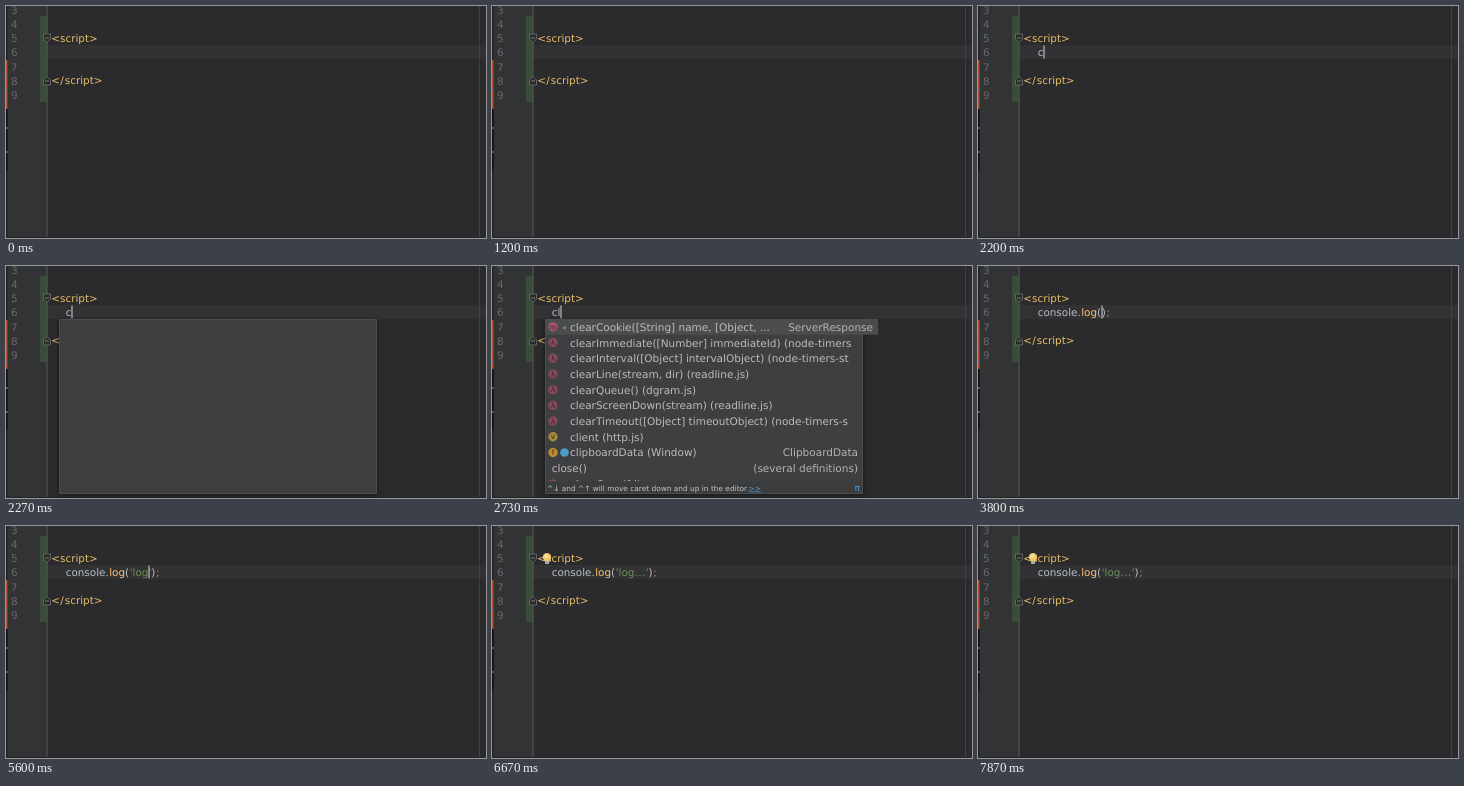
Animation, 480 px wide and 232 px high, one loop 7940 ms. Source, as an HTML page with a canvas:

```html
<!DOCTYPE html>
<html lang="en">
<head>
<meta charset="utf-8">
<style>
  html, body { margin: 0; width: 100%; height: 100%; overflow: hidden; background: #2b2a2c; }
  canvas { display: block; }
</style>
</head>
<body>
<canvas id="stage" width="480" height="232"></canvas>
<script>
const ctx = document.getElementById('stage').getContext('2d');
const LOOP = 7940;
const CODE = 10.4, LIST = 10.5, HINT = 7.4;
const ROW = 15.7;
const COLORS = { tag: '#e8bf6a', plain: '#b5bfcc', call: '#ffc66d', string: '#6a9159', end: '#cc7832' };

// Typed text on line 6: [time, before caret, after caret]
const EDITS = [
  [0, '', ''], [2200, 'c', ''], [2530, 'cl', ''], [2930, 'clo', ''], [3200, 'clog', ''],
  [3370, 'console.log(', ');'], [4870, "console.log('", "');"],
  [5130, "console.log('l", "');"], [5330, "console.log('lo", "');"],
  [5530, "console.log('log", "');"], [5730, "console.log('log.", "');"],
  [5900, "console.log('log..", "');"], [6070, "console.log('log...", "');"]
];

// [icon, label, right-hand note]
const ITEMS = [
  ['method', 'clearCookie([String] name, [Object, ...', 'ServerResponse'],
  ['lambda', 'clearImmediate([Number] immediateId) (node-timers'],
  ['lambda', 'clearInterval([Object] intervalObject) (node-timers-st'],
  ['lambda', 'clearLine(stream, dir) (readline.js)'],
  ['lambda', 'clearQueue() (dgram.js)'],
  ['lambda', 'clearScreenDown(stream) (readline.js)'],
  ['lambda', 'clearTimeout([Object] timeoutObject) (node-timers-s'],
  ['variable', 'client (http.js)'],
  ['field', 'clipboardData (Window)', 'ClipboardData'],
  ['', 'close()', '(several definitions)'],
  ['lambda', 'closeSync(fd)']
];
const ICONS = {
  method: ['#a5566a', 'm'], lambda: ['#85475a', 'λ'],
  variable: ['#a58a3c', 'v'], field: ['#c08a35', 'f']
};

function rect(x, y, w, h, color) {
  ctx.fillStyle = color;
  ctx.fillRect(x, y, w, h);
}

function dot(x, y, r, color) {
  ctx.fillStyle = color;
  ctx.beginPath();
  ctx.arc(x, y, r, 0, Math.PI * 2);
  ctx.fill();
}

function text(str, x, y, color, size = CODE, align = 'left') {
  ctx.font = `${size}px "DejaVu Sans", sans-serif`;
  ctx.textAlign = align;
  ctx.fillStyle = color;
  ctx.fillText(str, x, y);
  return x + ctx.measureText(str).width;
}

function clipped(x, y, w, h, draw) {
  ctx.save();
  ctx.beginPath();
  ctx.rect(x, y, w, h);
  ctx.clip();
  draw();
  ctx.restore();
}

function foldMark(y, dir) {
  ctx.beginPath();
  [[-3.5, -4], [3.5, -4], [3.5, 1], [0, 4.5], [-3.5, 1]].forEach(([px, py]) => ctx.lineTo(41 + px, y + py * dir));
  ctx.closePath();
  ctx.fillStyle = '#2b2a2c';
  ctx.fill();
  ctx.strokeStyle = '#626466';
  ctx.lineWidth = 1;
  ctx.stroke();
  rect(39, y - .5, 4, 1, '#77797b');
}

function editor() {
  rect(0, 0, 480, 232, '#2b2a2c');
  rect(0, 0, 41, 232, '#313335');
  rect(0, 0, 1.5, 232, '#222224');
  rect(0, 54, 1.5, 49, '#b6502f');
  rect(0, 103, 1.5, 61, '#101011');
  [69, 82, 94, 121, 145].forEach(y => rect(0, y, 1.5, 2, '#6d6664'));
  rect(41, 39, 439, 14, '#323133');
  rect(34, 10, 7, 86, '#384d38');
  rect(40.5, 0, 1, 232, '#58595b');
  rect(473, 0, 1, 232, '#414042');
  rect(0, 231, 480, 1, '#242325');
  for (let n = 3; n <= 9; n++) text(n, 5, 7.6 + (n - 3) * 14.25, '#67696c');
  foldMark(32, 1);
  foldMark(75, -1);
  text('<', 45.3, 35.7, COLORS.tag);
  text('script>', 54, 35.7, COLORS.tag);
  text('<', 45.3, 78.4, COLORS.tag);
  text('/', 54.2, 78.4, COLORS.tag);
  text('script>', 58.8, 78.4, COLORS.tag);
}

function codeLine(before, after) {
  const line = before + after;
  const quoteStart = line.indexOf("'"), quoteEnd = line.lastIndexOf("'");
  let x = 59.7, caretX = x;
  [...line].forEach((ch, i) => {
    let color = COLORS.plain;
    if (ch === ';') color = COLORS.end;
    else if (quoteStart >= 0 && i >= quoteStart && i <= quoteEnd) color = COLORS.string;
    else if (line.startsWith('console') && i > 7 && i < 11) color = COLORS.call;
    x = text(ch, x, 50, color) + ('()'.includes(ch) ? .65 : ch === '.' ? .45 : 0);
    if (i === before.length - 1) caretX = x;
  });
  return caretX;
}

function bulb() {
  dot(55, 31.3, 4.2, '#f0c869');
  dot(54.2, 30.3, 2, '#f8dfa0');
  rect(53, 35, 4, 3, '#a8a9aa');
}

function icon(kind, y) {
  if (!kind) return;
  const [color, letter] = ICONS[kind];
  dot(61, y, 4.7, color);
  text(letter, 61, y + 2.7, '#3a2b30', 7.5, 'center');
  if (kind === 'method') dot(72.5, y + 1, 1.7, '#5c9a4c');
  if (kind === 'field') dot(72.5, y, 4.3, '#4a9dc9');
}

function item([kind, label, note], top, prefix, selected) {
  const y = top + ROW / 2;
  icon(kind, y);
  const x = text(prefix, kind ? 78 : 59.7, y + 4, '#cdb4cf', LIST);
  text(label.slice(prefix.length), x, y + 4, '#bbbbbb', LIST);
  if (note) text(note, selected && kind ? 381 : 366, y + 4, '#b3b3b3', LIST, 'right');
}

function popup(items, height, prefix) {
  ctx.save();
  ctx.shadowColor = 'rgba(0,0,0,.5)';
  ctx.shadowBlur = 5;
  ctx.shadowOffsetY = 1;
  rect(53, 53, 318, height, '#3d3f41');
  ctx.restore();
  ctx.strokeStyle = '#4b4d4f';
  ctx.lineWidth = 1;
  ctx.strokeRect(53.5, 53.5, 317, height - 1);
  if (!items.length) return;

  const selectedWidth = items[0][0] ? 333 : 318;
  rect(53, 53, selectedWidth, ROW, '#4a4c4e');
  clipped(53, 53, selectedWidth, ROW, () => item(items[0], 53, prefix, true));
  const hintTop = 53 + height - 12.5;
  clipped(53, 53 + ROW, 313, hintTop - 53 - ROW, () =>
    items.slice(1).forEach((entry, i) => item(entry, 53 + (i + 1) * ROW, prefix)));
  rect(54, hintTop, 316, 11.5, '#3a3c3e');
  text('^↓ and ^↑ will move caret down and up in the editor', 55, hintTop + 9, '#c4c4c4', HINT);
  const end = text('>>', 256.5, hintTop + 9, '#4b9be0', HINT);
  rect(256.5, hintTop + 10, end - 256.5, .7, '#4b9be0');
  text('π', 368, hintTop + 9, '#4b9be0', 9, 'right');
}

// The caret blinks every 500 ms and restarts with each edit.
function caretOn(t, lastEdit) {
  return lastEdit ? Math.floor((t - lastEdit) / 500) % 2 === 0 : Math.floor((t + 630) / 500) % 2 === 0;
}

function render(t) {
  editor();
  const [lastEdit, before, after] = EDITS.findLast(([start]) => start <= t);
  const caretX = codeLine(before, after);
  if (caretOn(t, lastEdit)) rect(Math.round(caretX * 2) / 2, 39.5, 1, 13, '#d8d8d8');
  if ((t >= 4270 && t < 4870) || t >= 6600) bulb();
  if (t >= 2270 && t < 2400) popup([], 175, before);
  else if (t >= 2400 && t < 2930) popup(ITEMS, 175, before);
  else if (t >= 2930 && t < 3200) popup([ITEMS[9]], 29, before);
}

ctx.textRendering = 'geometricPrecision';
const startTime = performance.now();
function tick() {
  render((performance.now() - startTime) % LOOP);
  requestAnimationFrame(tick);
}
tick();
</script>
</body>
</html>
```
